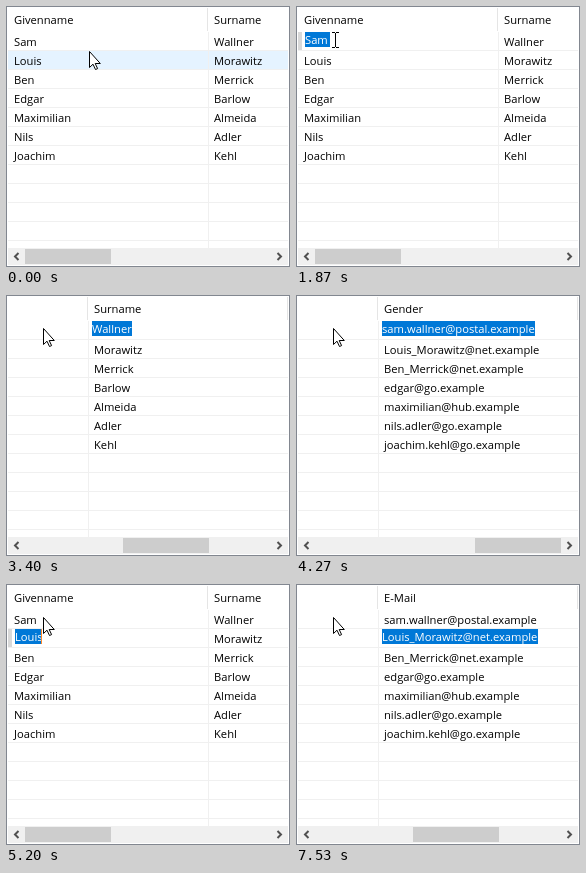
Animation, 284 px wide and 261 px high, one loop 8 s. Source, as an HTML page:

```html
<!DOCTYPE html>
<html lang="en">
<head>
<meta charset="utf-8">
<title>Tab editing in a table</title>
<style>
  html, body { margin: 0; width: 284px; height: 261px; overflow: hidden; background: #fff; }
  svg { display: block; }
  text { font: 11.2px "Open Sans", "Noto Sans", sans-serif; fill: #000; white-space: pre; }
  rect { shape-rendering: crispEdges; }
  .grid { fill: #f0f0f0; }
  .chevron { fill: none; stroke: #505050; stroke-width: 2; }
</style>
</head>
<body>
<svg id="stage" width="284" height="261" viewBox="0 0 284 261">
  <clipPath id="view"><rect x="2" y="2" width="280" height="240"/></clipPath>
  <rect width="284" height="261" fill="#828790"/>
  <rect x="1" y="1" width="282" height="259" fill="#fff"/>
  <g clip-path="url(#view)">
    <rect id="hover" x="2" width="280" height="18" fill="#e5f3ff"/>
    <rect id="focus" x="2" y="26" width="200" height="18" fill="#cce8ff"/>
    <g id="lines"></g>
    <g id="body"></g>
    <g id="header"></g>
  </g>
  <rect x="2" y="242" width="280" height="17" fill="#f0f0f0"/>
  <rect id="thumb" y="243" width="86" height="15" fill="#cdcdcd"/>
  <path class="chevron" d="M12.5 247l-3.5 3.5 3.5 3.5M271.5 247l3.5 3.5-3.5 3.5"/>
  <path id="arrow" d="M.5.5V16.5L4 13.2 6.5 18.5 8.6 17.6 6.2 12.5H11.3Z" fill="#fff" stroke="#000"/>
  <path id="beam" d="M36 26.5h3M40 26.5h3M39.5 27v14M36 41.5h3M40 41.5h3" fill="none" stroke="#000" shape-rendering="crispEdges"/>
</svg>
<script>
const $ = id => document.getElementById(id);
const LOOP = 8000, ROW = 19, COL = 200;
const titles = ['Givenname', 'Surname', 'E-Mail', 'Gender'];
const people = [
  ['Sam', 'Wallner', 'sam.wallner@postal.example'],
  ['Louis', 'Morawitz', 'Louis_Morawitz@net.example'],
  ['Ben', 'Merrick', 'Ben_Merrick@net.example'],
  ['Edgar', 'Barlow', 'edgar@go.example'],
  ['Maximilian', 'Almeida', 'maximilian@hub.example'],
  ['Nils', 'Adler', 'nils.adler@go.example'],
  ['Joachim', 'Kehl', 'joachim.kehl@go.example']
].map(p => [...p, 'M']);
const scrollX = [0, 120, 320, 520];
const selWidth = [[25, 40, 153, 12], [27, 51, 156, 12]];

// start, header column, body column, thumb column, edited row, caret-off time
const steps = [
  [1330, 0, 0, 0, 0, 1870],
  [2400, 0, 0, 0, 0, 2600],
  [2600, 0, 0, 1, 0, 2670],
  [2670, 1, 1, 1, 0, 3200],
  [3400, 1, 1, 2, 0, 0],
  [3470, 2, 2, 2, 0, 4000],
  [4270, 3, 2, 3, 0, 0],
  [4330, 3, 3, 3, 0, 0],
  [5200, 0, 0, 0, 1, 5730],
  [5930, 0, 0, 1, 1, 0],
  [6000, 1, 1, 1, 1, 6470],
  [7000, 1, 1, 2, 1, 0],
  [7070, 2, 2, 2, 1, 7530]
];
const idle = [0, 0, 0, 0, -1, 0];

// start, x, y
const pointer = [
  [0, 83, 45], [70, 82, 45], [270, 80, 46], [335, 72, 49], [400, 61, 48],
  [470, 51, 43], [530, 44, 38], [600, 39, 35], [670, 37, 33]
];

function add(parent, tag, attrs, label) {
  const el = document.createElementNS('http://www.w3.org/2000/svg', tag);
  for (const k in attrs) el.setAttribute(k, attrs[k]);
  if (label) el.textContent = label;
  parent.appendChild(el);
  return el;
}
const box = (parent, x, y, width, height, fill) => add(parent, 'rect', { x, y, width, height, fill });
const show = (el, on) => el.setAttribute('visibility', on ? 'visible' : 'hidden');
const move = (el, x, y) => el.setAttribute('transform', `translate(${x} ${y})`);
const at = (list, t, first) => list.reduce((hit, s) => s[0] <= t ? s : hit, first);

for (let y = 44; y < 242; y += ROW)
  add($('lines'), 'rect', { x: 2, y, width: 280, height: 1, class: 'grid' });

box($('header'), 2, 2, 800, 24, '#fff');
titles.forEach((title, c) => {
  const x = 2 + c * COL;
  add($('header'), 'text', { x: x + 6, y: 18 }, title);
  box($('header'), x + COL - 1, 2, 1, 23, '#e5e5e5');
  people.forEach((p, r) => add($('body'), 'text', { x: x + 6, y: 40 + r * ROW }, p[c]));
});

function makeEditor(r, c) {
  const g = add($('body'), 'g', {});
  const x = 2 + c * COL, y = 26 + r * ROW, w = selWidth[r][c];
  const sel = x + (c ? 4 : 7);
  box(g, x, y, COL, 18, '#d9d9d9');
  box(g, sel - 3, y, x + COL - sel + 3, 18, '#fff');
  box(g, sel, y, w, 15, '#0078d7');
  add(g, 'text', { x: sel, y: y + 12, style: 'fill:#fff' }, people[r][c]);
  if (c === 3) {
    box(g, x + COL - 17, y, 17, 18, '#e1e1e1');
    add(g, 'path', { d: `M${x + COL - 12} ${y + 7}h7l-3.5 4z` });
  }
  return { g, caret: box(g, sel + w - 1, y, 1, 15, '#ff8728') };
}
const editors = [0, 1].map(r => titles.map((_, c) => makeEditor(r, c)));

for (let c = 1; c < 4; c++)
  add($('body'), 'rect', { x: 2 + c * COL, y: 26, width: 1, height: 216, class: 'grid' });

function draw(t) {
  const [, head, col, bar, row, off] = at(steps, t, idle);
  const [, px, py] = at(pointer, t, pointer[0]);
  move($('header'), -scrollX[head], 0);
  move($('body'), -scrollX[col], 0);
  $('thumb').setAttribute('x', Math.round(19 + scrollX[bar] * 246 / 800));
  editors.forEach((list, r) => list.forEach((e, c) => {
    const open = r === row && c === col;
    show(e.g, open);
    show(e.caret, open && t < off);
  }));
  show($('hover'), t < 1130);
  $('hover').setAttribute('y', py < 45 ? 26 : 45);
  show($('focus'), t >= 1130 && t < 1330);
  const typing = t >= 1330 && t < 2670;
  show($('beam'), typing);
  show($('arrow'), !typing);
  move($('arrow'), px, py);
}

function tick() {
  draw(performance.now() % LOOP);
  requestAnimationFrame(tick);
}
tick();
</script>
</body>
</html>
```
